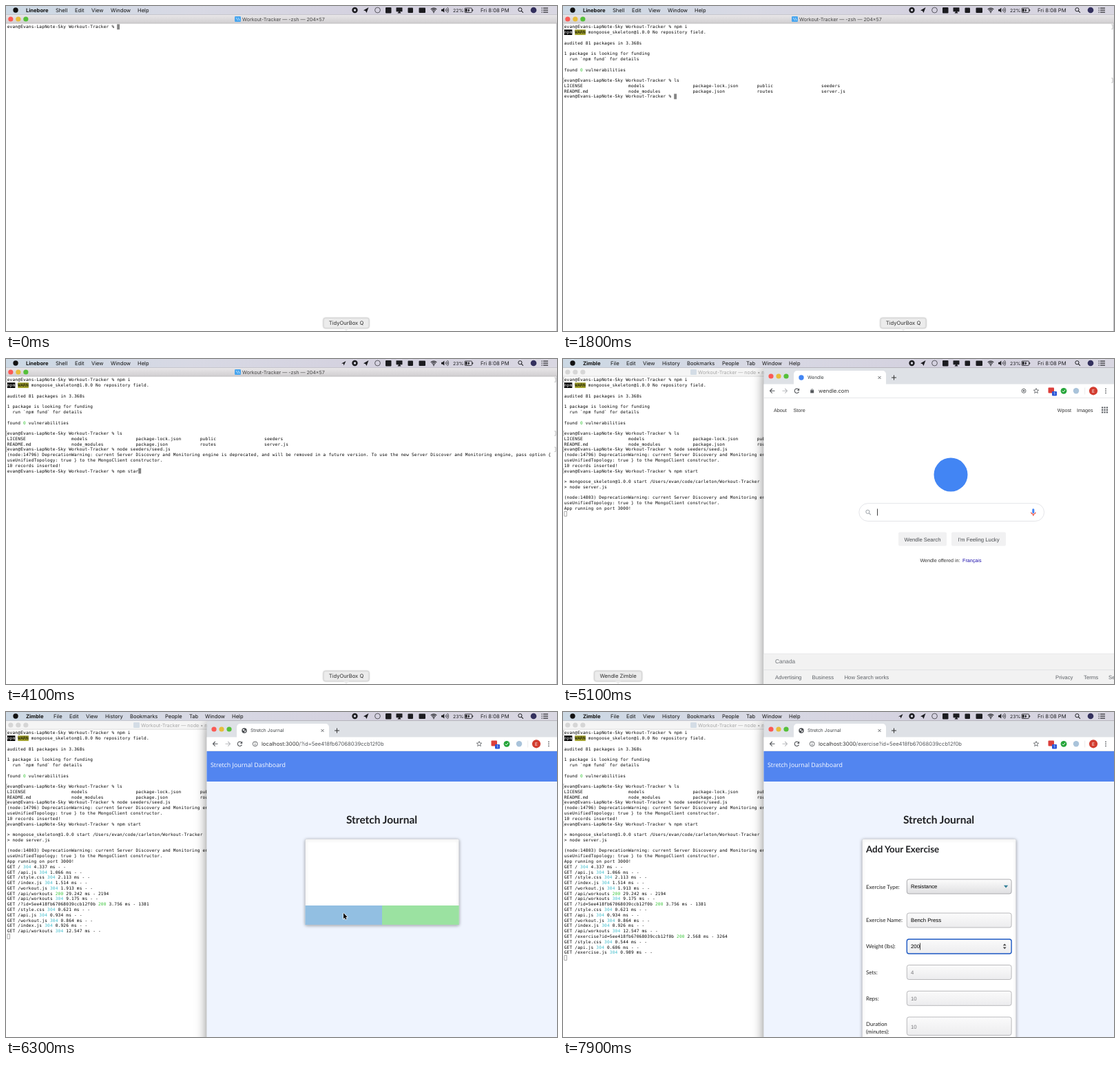
Animation of 800x472 px, one loop 8 s. Source, as an HTML page with a canvas:

```html
<!DOCTYPE html>
<html lang="en">
<head>
<meta charset="utf-8">
<title>Workout-Tracker</title>
<style>
html, body { margin: 0; width: 100%; height: 100%; overflow: hidden; background: #fff; }
canvas { display: block; width: 800px; height: 472px; }
</style>
</head>
<body>
<canvas id="stage" width="800" height="472"></canvas>
<script>
const ctx = document.getElementById('stage').getContext('2d');
const LOOP = 8000, STEP = 100;
const UI = 'Inter, sans-serif', ARIAL = '"Liberation Sans", sans-serif';
const LATO = 'Lato, sans-serif', OPEN = '"Open Sans", sans-serif';
const MONO = '"DejaVu Sans Mono", monospace';
const COL = 3.889, ROW = 7.78;
const PROMPT = 'evan@Evans-LapNote-Sky Workout-Tracker % ';
const APP = 'Stretch Journal', ID = '5ee418fb67068039ccb12f0b', HOST = 'localhost:3000';
const OPEN_AT = 4900, TYPE_AT = 5200, LOAD_AT = 6000, FORM_AT = 6500, GROW_AT = 6900;

// ---------- drawing helpers ----------
function text(s, x, y, size, color = '#222', font = UI, weight = 400, align = 'left') {
  ctx.font = `${weight} ${size}px ${font}`;
  ctx.fillStyle = color;
  ctx.textAlign = align;
  ctx.fillText(s, x, y + size * 0.36);
  return x + ctx.measureText(s).width;
}
function rect(x, y, w, h, color) {
  ctx.fillStyle = color;
  ctx.fillRect(x, y, w, h);
}
function box(x, y, w, h, r, fill, stroke, lw = 0.7) {
  ctx.beginPath();
  ctx.roundRect(x, y, w, h, r);
  if (fill) { ctx.fillStyle = fill; ctx.fill(); }
  if (stroke) { ctx.strokeStyle = stroke; ctx.lineWidth = lw; ctx.stroke(); }
}
function disc(x, y, r, fill, stroke, lw = 1) {
  ctx.beginPath();
  ctx.arc(x, y, r, 0, 7);
  if (fill) { ctx.fillStyle = fill; ctx.fill(); }
  if (stroke) { ctx.strokeStyle = stroke; ctx.lineWidth = lw; ctx.stroke(); }
}
// Each argument after the style is one polyline: [x, y, x, y, ...]
function lines(color, lw, ...paths) {
  ctx.strokeStyle = color;
  ctx.lineWidth = lw;
  ctx.beginPath();
  for (const p of paths)
    for (let i = 0; i < p.length; i += 2) ctx[i ? 'lineTo' : 'moveTo'](p[i], p[i + 1]);
  ctx.stroke();
}
function poly(color, ...p) {
  ctx.fillStyle = color;
  ctx.beginPath();
  for (let i = 0; i < p.length; i += 2) ctx.lineTo(p[i], p[i + 1]);
  ctx.closePath();
  ctx.fill();
}
function fade(x0, y0, x1, y1, ...colors) {
  const g = ctx.createLinearGradient(x0, y0, x1, y1);
  colors.forEach((c, i) => g.addColorStop(i / (colors.length - 1), c));
  return g;
}
function shadow(blur, alpha, dy = 0) {
  ctx.shadowColor = `rgba(0,0,0,${alpha})`;
  ctx.shadowBlur = blur;
  ctx.shadowOffsetY = dy;
}
function arc(x, y, r, a, b, color, lw) {
  ctx.beginPath();
  ctx.arc(x, y, r, a, b);
  ctx.strokeStyle = color;
  ctx.lineWidth = lw;
  ctx.stroke();
}
const lights = (x, y, colors) => colors.forEach((c, i) => disc(x + i * 11, y, 3.6, c));
const LIVE = ['#fb5a55', '#e6bd3a', '#55c03a'];
function lens(x, y, r, color) {
  disc(x - 0.6, y - 0.6, r, null, color, 1);
  lines(color, 1.1, [x + r * 0.5, y + r * 0.5, x + r * 1.5, y + r * 1.5]);
}
function globe(x, y) {
  disc(x, y, 3.7, '#4a4d51');
  poly('#fff', x - 2.6, y - 1.4, x - 0.2, y - 2.2, x + 0.4, y - 0.4, x - 1.2, y + 0.5);
  poly('#fff', x + 0.4, y + 0.6, x + 2.5, y - 0.4, x + 1.6, y + 2.2, x + 0.2, y + 2.4);
}
const cross = (x, y, r, c) => lines(c, 0.9, [x - r, y - r, x + r, y + r], [x + r, y - r, x - r, y + r]);
const typed = (s, t, from, per) => s.slice(0, Math.max(0, Math.floor((t - from) / per)));

// ---------- shell session ----------
const rows = [];
const out = (at, ...list) => list.forEach(s => rows.push({ at, s }));
const cmd = (at, s, from, per, enter) => rows.push({ at, s, from, per, enter });
const warn = pid => [
  `(node:${pid}) DeprecationWarning: current Server Discovery and Monitoring engine is deprecated, and will be removed in a future version. To use the new Server Discover and Monitoring engine, pass option {`,
  'useUnifiedTopology: true } to the MongoClient constructor.'];
const cells = (...a) => a.map(s => s.padEnd(24)).join('');
const get = (path, code, ms, size = '-') => `GET ${path} ${code} ${ms} ms - ${size}`;

cmd(0, 'npm i', 0, 100, 600);
out(900, 'npm WARN mongoose_skeleton@1.0.0 No repository field.', '', 'audited 81 packages in 3.368s');
out(1000, '', '1 package is looking for funding', '  run `npm fund` for details', '', 'found 0 vulnerabilities', '');
cmd(1000, 'ls', 1300, 100, 1600);
out(1700, cells('LICENSE', 'models', 'package-lock.json', 'public', 'seeders'),
  cells('README.md', 'node_modules', 'package.json', 'routes', 'server.js'));
cmd(1700, 'node seeders/seed.js', 1900, 40, 2800);
out(3000, ...warn(14796));
out(3300, '10 records inserted!');
cmd(3400, 'npm start', 3600, 62, 4300);
out(4300, '', '> mongoose_skeleton@1.0.0 start /Users/evan/code/carleton/Workout-Tracker', '> node server.js', '');
out(4500, ...warn(14803), 'App running on port 3000!');
out(5500, get('/', 304, '4.337'), get('/api.js', 304, '1.066'), get('/style.css', 304, '2.113'),
  get('/index.js', 304, '1.514'), get('/workout.js', 304, '1.913'));
out(6000, get('/api/workouts', 200, '29.242', 2194), get('/api/workouts', 304, '9.175'));
out(6100, get('/?id=' + ID, 200, '3.756', 1381), get('/style.css', 304, '0.621'), get('/api.js', 304, '0.934'),
  get('/workout.js', 304, '0.864'), get('/index.js', 304, '0.926'), get('/api/workouts', 304, '12.547'));
out(FORM_AT, get(`/exercise?id=${ID}`, 200, '2.568', 3264), get('/style.css', 304, '0.544'),
  get('/api.js', 304, '0.606'), get('/exercise.js', 304, '0.989'));

function mono(s, col, row, color = '#000') {
  ctx.font = `400 6.11px ${MONO}`;
  ctx.letterSpacing = (COL - 6.11 * 0.602).toFixed(3) + 'px';
  ctx.fillStyle = color;
  ctx.textAlign = 'left';
  ctx.fillText(s, 1.7 + col * COL, 32.3 + row * ROW);
  ctx.letterSpacing = '0px';
}
function shellRow(s, row) {
  const tag = /^npm WARN/.test(s);
  const hit = /^(GET \S+ |found )(\d+)/.exec(s);
  if (tag) {
    const y = 26.5 + row * ROW;
    rect(1.7, y, 3 * COL, ROW, '#000');
    rect(1.7 + 4 * COL, y, 4 * COL, ROW, '#a0a02a');
    mono('npm', 0, row, '#fff');
    mono(s.slice(4), 4, row);
  } else if (hit) {
    const a = hit[1].length, b = a + hit[2].length;
    mono(s.slice(0, a), 0, row);
    mono(hit[2], a, row, hit[2] === '304' ? '#3fbccb' : '#35c435');
    mono(s.slice(b), b, row);
  } else mono(s, 0, row);
}
function shell(t) {
  const live = t < OPEN_AT;
  rect(0, 12, 800, 460, '#fff');
  rect(0, 13, 800, 12, live ? fade(0, 13, 0, 25, '#e8e6e8', '#d1cfd1') : '#f5f5f5');
  rect(0, 12, 800, 0.8, '#aaa9b0');
  rect(0, 24.7, 800, 0.8, live ? '#b4b2b4' : '#d5d5d5');
  lights(6.8, 19, live ? LIVE : ['#d6d6d6', '#d6d6d6', '#d6d6d6']);
  const busy = t >= 4300;
  const title = `Workout-Tracker — ${busy ? 'node • npm start' : '-zsh'} — 204×57`;
  const x = live ? (busy ? 322 : 343) : 196;
  box(x - 11, 15, 9, 8, 1.2, live ? '#48a5ee' : '#d4dde6');
  if (live) lines('#d9efff', 0.8, [x - 9, 17, x - 6, 21], [x - 6, 17, x - 3.5, 21]);
  text(title, x, 19, 7.1, live ? '#444' : '#a6a6a6');
  rect(799, 25, 1, 447, '#b9b9bd');

  let n = 0, cx = 0, cy = 0;
  for (const r of rows) {
    if (t < r.at) break;
    cx = 0;
    cy = n + 1;
    if (r.enter !== undefined) {
      const s = PROMPT + typed(r.s, t, r.from, r.per);
      mono(s, 0, n);
      const y = 27 + n * ROW;
      if (t >= r.enter) {
        lines('#8d8d8d', 0.6, [2, y, 0.6, y, 0.6, y + 6.4, 2, y + 6.4], [796.5, y, 798, y, 798, y + 6.4, 796.5, y + 6.4]);
      } else {
        cx = s.length;
        cy = n;
      }
    } else shellRow(r.s, n);
    n++;
  }
  const px = 1.7 + cx * COL, py = 26.4 + cy * ROW;
  if (live) rect(px, py, COL, ROW, '#858585');
  else box(px + 0.3, py + 0.4, COL - 0.4, ROW - 0.8, 0, null, '#858585', 0.7);
}

// ---------- menu bar ----------
function menu(t) {
  rect(0, 0, 800, 12.4, fade(0, 0, 800, 0, '#cbd8e4', '#d8d9e4', '#d4d1df', '#d9d7e2'));
  disc(14, 6, 3.7, '#111');
  const items = t < OPEN_AT
    ? [['Linebore', 29], ['Shell', 72], ['Edit', 100], ['View', 124], ['Window', 152], ['Help', 191]]
    : [['Zimble', 29], ['File', 69], ['Edit', 92], ['View', 116], ['History', 144], ['Bookmarks', 180],
       ['People', 231], ['Tab', 266], ['Window', 289], ['Help', 328]];
  items.forEach(([s, x], i) => text(s, x, 6.1, 7.6, '#111', UI, i ? 400 : 700));
  const ink = '#1c1c20';
  if ((t >= 3300 && t < 4700) || t >= 6400) poly(ink, 487, 6.5, 493.5, 3, 490.5, 9.5, 489.8, 6.8);
  disc(506.5, 6, 4.2, ink);
  box(505, 4.5, 3, 3, 0.4, '#d8d8e2');
  poly(ink, 519, 6.2, 526.5, 2, 523.5, 10, 522, 7.2);
  disc(539.5, 6, 3.9, null, '#4a4a52', 0.9);
  box(551, 2, 8.5, 8.5, 1, ink);
  box(566.5, 2.2, 9, 6, 0.6, ink);
  poly(ink, 570.3, 8, 572, 8, 573.5, 10.4, 568.5, 10.4);
  box(583.5, 2.5, 7.5, 7.5, 1, ink);
  box(599.5, 2.5, 9.5, 7.5, 1, ink);
  for (const r of [2.2, 4.3, 6.4]) arc(621, 9.6, r, -2.3, -0.84, ink, 1.2);
  disc(621, 9.5, 0.8, ink);
  poly(ink, 632, 4.7, 633.8, 4.7, 636.3, 2.5, 636.3, 9.6, 633.8, 7.4, 632, 7.4);
  for (const r of [2, 4, 6]) arc(636.5, 6, r, -0.75, 0.75, ink, 0.8);
  text(t < 3300 ? '22%' : '23%', 649, 6.1, 6.9, ink);
  box(666, 3, 10.5, 6.4, 1, null, ink, 0.8);
  rect(667, 4, 2.4, 4.4, ink);
  rect(677.2, 5, 1, 2.4, ink);
  poly(ink, 672.5, 3.4, 669.6, 6.5, 671.3, 6.5, 670.6, 9.1, 673.8, 5.7, 672, 5.7);
  text('Fri 8:08 PM', 689, 6.1, 7.65, ink);
  lens(747, 5.8, 2.6, ink);
  disc(766, 6, 4.3, '#34315e');
  for (const y of [3, 6, 9]) {
    rect(777.5, y - 0.5, 1.3, 1.1, ink);
    rect(780, y - 0.5, 7, 1.1, ink);
  }
}

function tip(s, x) {
  ctx.font = `400 7.6px ${UI}`;
  const w = ctx.measureText(s).width + 16;
  ctx.save();
  shadow(2, 0.2);
  box(x - w / 2, 453, w, 15, 3, '#ececec', '#cfcfcf', 0.6);
  ctx.restore();
  poly('#ececec', x - 4.5, 467.6, x + 4.5, 467.6, x, 472);
  text(s, x, 460.6, 7.6, '#2d2d2d', UI, 400, 'center');
}

// ---------- browser ----------
function frame(t) {
  const home = t < LOAD_AT, ink = '#55585c';
  ctx.save();
  shadow(16, 0.5, 4);
  box(291.5, 13, 520, 480, [4, 0, 0, 0], '#dee1e6');
  ctx.restore();
  lights(302, 25, LIVE);
  box(335, 17, 134, 22, [5, 5, 0, 0], '#fff');
  rect(291.5, 36.5, 508.5, 20.5, '#fff');
  rect(291.5, 56.3, 508.5, 0.7, '#dcdde0');
  if (home) disc(346, 27, 3.7, '#4285f4');
  else globe(346, 27);
  text(home ? 'Wendle' : APP, 355, 27, 6.7, '#3c4043');
  cross(459.5, 27, 2, ink);
  lines('#333', 1, [477, 27, 484, 27], [480.5, 23.5, 480.5, 30.5]);
  lines(ink, 1.1, [307.5, 46.3, 300.5, 46.3], [303.8, 43, 300.5, 46.3, 303.8, 49.6]);
  lines('#b9bbbe', 1.1, [318.5, 46.3, 325.5, 46.3], [322.2, 43, 325.5, 46.3, 322.2, 49.6]);
  arc(339.5, 46.3, 3.2, 0.4, 5.6, ink, 1.1);
  poly(ink, 343.2, 42.6, 343.2, 46, 339.8, 46);

  if (t < TYPE_AT) {
    rect(359.2, 45.2, 5, 4.2, ink);
    arc(361.7, 45.2, 1.5, Math.PI, 0, ink, 0.8);
    text('wendle.com', 371, 46.3, 7.7, '#333');
    disc(669, 46.3, 3, null, ink, 0.9);
    disc(669, 46.3, 1.2, ink);
  } else if (!home) {
    disc(361.7, 46.3, 3.4, null, ink, 0.9);
    lines(ink, 0.9, [361.7, 45.8, 361.7, 48.3], [361.7, 44.1, 361.7, 45]);
    const x = text(HOST, 371, 46.3, 7.7, '#333');
    const path = t >= FORM_AT ? '/exercise?id=' + ID : t >= 6100 ? '/?id=' + ID : '';
    text(path, x, 46.3, 7.7, '#55585c');
  }
  if (t < TYPE_AT || !home) {
    const star = [];
    for (let i = 0; i <= 10; i++) {
      const a = i * Math.PI / 5 - Math.PI / 2, r = i % 2 ? 1.7 : 3.9;
      star.push(687 + r * Math.cos(a), 46.4 + r * Math.sin(a));
    }
    lines(ink, 0.8, star);
  }
  box(704.5, 41.5, 8.5, 8, 1, '#dc3f3c');
  box(710, 47, 7, 6.5, 1, '#2a56d8');
  text('1', 713.5, 50.3, 5, '#fff', UI, 500, 'center');
  disc(727, 46.3, 4.4, '#25a53a');
  lines('#fff', 1, [724.9, 46.4, 726.4, 48, 729.2, 44.7]);
  disc(745, 46.3, 4.2, '#a9c3da');
  rect(757.5, 41.5, 0.6, 10, '#ddd');
  disc(770, 46.3, 6.1, '#d23c2f');
  text('E', 770, 46.3, 6.5, '#fff', UI, 400, 'center');
  for (const y of [43.3, 46.3, 49.3]) disc(788, y, 0.9, ink);
}

function searchPage(t) {
  rect(291.5, 57, 508.5, 415, '#fff');
  const dark = '#333', grey = '#5f6368';
  text('About', 306, 74, 7.2, dark, ARIAL);
  text('Store', 334.5, 74, 7.2, dark, ARIAL);
  text('Wpost', 738, 74, 7.2, dark, ARIAL, 400, 'right');
  text('Images', 746, 74, 7.2, dark, ARIAL);
  for (let i = 0; i < 9; i++) rect(782 + (i % 3) * 3.4, 69.5 + Math.floor(i / 3) * 3.4, 2.2, 2.2, grey);
  disc(563, 168, 24.5, '#4285f4');
  box(429.8, 209.7, 268.8, 25.8, 12.9, '#fff', '#dcdee2', 0.8);
  lens(443, 222.5, 2.6, '#9aa0a6');
  if (t < TYPE_AT) rect(456, 217.5, 0.8, 10, '#111');
  box(681.3, 217.2, 3, 7, 1.5, '#4285f4');
  arc(682.8, 222, 3.4, 0.2, Math.PI - 0.2, '#ea4335', 1.1);
  rect(682.2, 225.2, 1.2, 2.8, '#ea4335');
  box(487, 251.5, 70, 20, 2, '#f1f1f2');
  box(564, 251.5, 79, 20, 2, '#f1f1f2');
  text('Wendle Search', 522, 262, 7.78, '#484b4f', ARIAL, 400, 'center');
  text("I'm Feeling Lucky", 603.5, 262, 7.78, '#484b4f', ARIAL, 400, 'center');
  text('Wendle offered in:', 576.5, 292.7, 7.2, '#333', ARIAL, 400, 'right');
  text('Français', 580, 292.7, 7.2, '#1a0dab', ARIAL);
  rect(291.5, 428, 508.5, 44, '#f2f2f2');
  rect(291.5, 427.7, 508.5, 0.7, '#e1e2e4');
  rect(291.5, 451, 508.5, 0.7, '#dadce0');
  text('Canada', 308, 439.2, 8.33, '#6c7075', ARIAL);
  [['Advertising', 308], ['Business', 361.5], ['How Search works', 408.5], ['Privacy', 715], ['Terms', 756], ['Settings', 792]]
    .forEach(([s, x]) => text(s, x, 462.2, 7.78, grey, ARIAL));
}

const hints = [
  [APP, HOST, ''], null,
  [APP, HOST, '/?id=5ee2fb285ab88a047a7a2a21'],
  [APP, HOST, '/?id=5ee240dee98a9665cd934d57'],
  [APP, HOST, '/exercise'],
  ['Stretch Graph', HOST, '/stats'],
  ['Nab-Ya-Noodle!', HOST, '/?#']];
function suggestions(t) {
  ctx.save();
  shadow(7, 0.4, 1.5);
  box(348, 37.5, 352.5, 159, 4, '#fff');
  ctx.restore();
  globe(361.7, 46.3);
  text(typed(HOST, t, TYPE_AT - 40, 40), 377, 46.3, 7.7, '#222');
  rect(348, 56.3, 352.5, 20, '#dadbdc');
  cross(689, 66.3, 2.4, '#55585c');
  hints.forEach((h, i) => {
    const y = 66.3 + i * 20;
    if (!h) {
      lens(361.7, y, 2.5, '#6b6e72');
      text(' - Wendle Search', text(HOST, 377, y, 7.7), y, 7.7, '#6b6e72');
      return;
    }
    globe(361.7, y);
    let x = text(h[0], 377, y, 7.7);
    x = text(' - ', x, y, 7.7, '#6b6e72');
    x = text(h[1], x, y, 7.7, '#1c56c4', UI, 600);
    text(h[2], x, y, 7.7, '#1c56c4');
  });
}

function field(y, value, hint, focus) {
  box(499.3, y, 151.8, 21, 3, fade(0, y, 0, y + 21, '#fbfbfb', '#ececee'), focus ? '#1c58c4' : '#a9a9ad', focus ? 1.4 : 0.8);
  const x = text(value || hint, 505, y + 10.5, 7.78, value ? '#000' : '#7a7a7d', ARIAL);
  if (focus) rect(value ? x + 0.3 : 505, y + 5.5, 0.7, 10, '#000');
}
function trackerPage(t) {
  const form = t >= FORM_AT, grown = t >= GROW_AT;
  rect(291.5, 57, 508.5, 415, '#eff4fe');
  rect(291.5, 57, 508.5, 44, '#5285f0');
  text(APP + ' Dashboard', 297, 77, 8.89, '#fff', OPEN);
  text(APP, 545.5, 156.5, 15.5, '#1f2023', LATO, 700, 'center');
  ctx.save();
  shadow(4, 0.35, 1);
  box(434.5, 184.5, 223.2, grown ? 320 : 124.5, 2, '#fff', '#d2d4da', 0.6);
  ctx.restore();
  if (!grown) {
    rect(434.5, 281, 111.5, 28, '#92bfe2');
    rect(546, 281, 111.7, 28, '#9be2a1');
  }
  if (!form) return;
  text('Add Your Exercise', 440, 199, 13.33, '#1f2023', LATO, 700);
  const label = (s, y) => text(s, 440, y, 7.9, '#222', LATO);
  label('Exercise Type:', 254);
  box(499.3, 243, 151.8, 21, 3, fade(0, 243, 0, 264, '#fcfcfc', '#dfdfe1'), '#98989c', 0.8);
  text(grown ? 'Resistance' : 'Select Exercise Type', 505, 253.5, 7.78, '#000', ARIAL);
  poly('#2f7d96', 640, 251.8, 646.2, 251.8, 643.1, 255.4);
  if (!grown) {
    text('Complete', 490, 295.5, 11.1, '#fff', LATO, 700, 'center');
    text('Add Exercise', 601.5, 295.5, 11.1, '#fff', LATO, 700, 'center');
    return;
  }
  const onWeight = t >= 7700;
  label('Exercise Name:', 302.5);
  field(292, typed('Bench Press', t, 7060, 50), 'Bench Press', t >= 7000 && !onWeight);
  label('Weight (lbs):', 340.5);
  field(330, typed('200', t, 7690, 65), '200', onWeight);
  if (onWeight) {
    poly('#444', 638.8, 339.2, 643.6, 339.2, 641.2, 336.6);
    poly('#444', 638.8, 341.6, 643.6, 341.6, 641.2, 344.2);
  }
  label('Sets:', 378.5);
  field(367.5, '', '4');
  label('Reps:', 416);
  field(405.3, '', '10');
  label('Duration', 453.5);
  label('(minutes):', 464.5);
  box(499.3, 443, 151.8, 26.5, 3, fade(0, 443, 0, 470, '#fbfbfb', '#ececee'), '#a9a9ad', 0.8);
  text('10', 505, 456.8, 7.78, '#7a7a7d', ARIAL);
}

// ---------- pointer: time, x, y ----------
const trail = [[5100, 80, 480], [5400, 365, 224], [5900, 365, 224], [6300, 490, 292], [6400, 490, 292],
  [6700, 537, 241], [6800, 537, 250], [7000, 540, 302]];
function pointer(t) {
  if (t <= 5100 || t > 7000) return;
  const i = trail.findIndex(p => p[0] >= t);
  const [a, b] = [trail[i - 1], trail[i]];
  let k = (t - a[0]) / (b[0] - a[0]);
  k = k * k * (3 - 2 * k);
  ctx.save();
  ctx.translate(a[1] + (b[1] - a[1]) * k, a[2] + (b[2] - a[2]) * k);
  const shape = [0, 0, 0, 8.2, 1.8, 6.5, 3.1, 9.4, 4.4, 8.8, 3.2, 6, 5.6, 5.8];
  lines('#fff', 1.3, [...shape, 0, 0]);
  poly('#000', ...shape);
  ctx.restore();
}

function draw(now) {
  const t = Math.floor((now % LOOP) / STEP) * STEP;
  ctx.textRendering = 'geometricPrecision';
  shell(t);
  if (t < 4600) tip('TidyOurBox Q', 494);
  if (t >= OPEN_AT) {
    frame(t);
    if (t < LOAD_AT) searchPage(t);
    else trackerPage(t);
    if (t >= TYPE_AT && t < LOAD_AT) suggestions(t);
  }
  if (t >= 4800 && t < TYPE_AT) tip('Wendle Zimble', 80);
  menu(t);
  pointer(t);
}

const start = performance.now();
function tick() {
  draw(performance.now() - start);
  requestAnimationFrame(tick);
}
tick();
</script>
</body>
</html>
```
